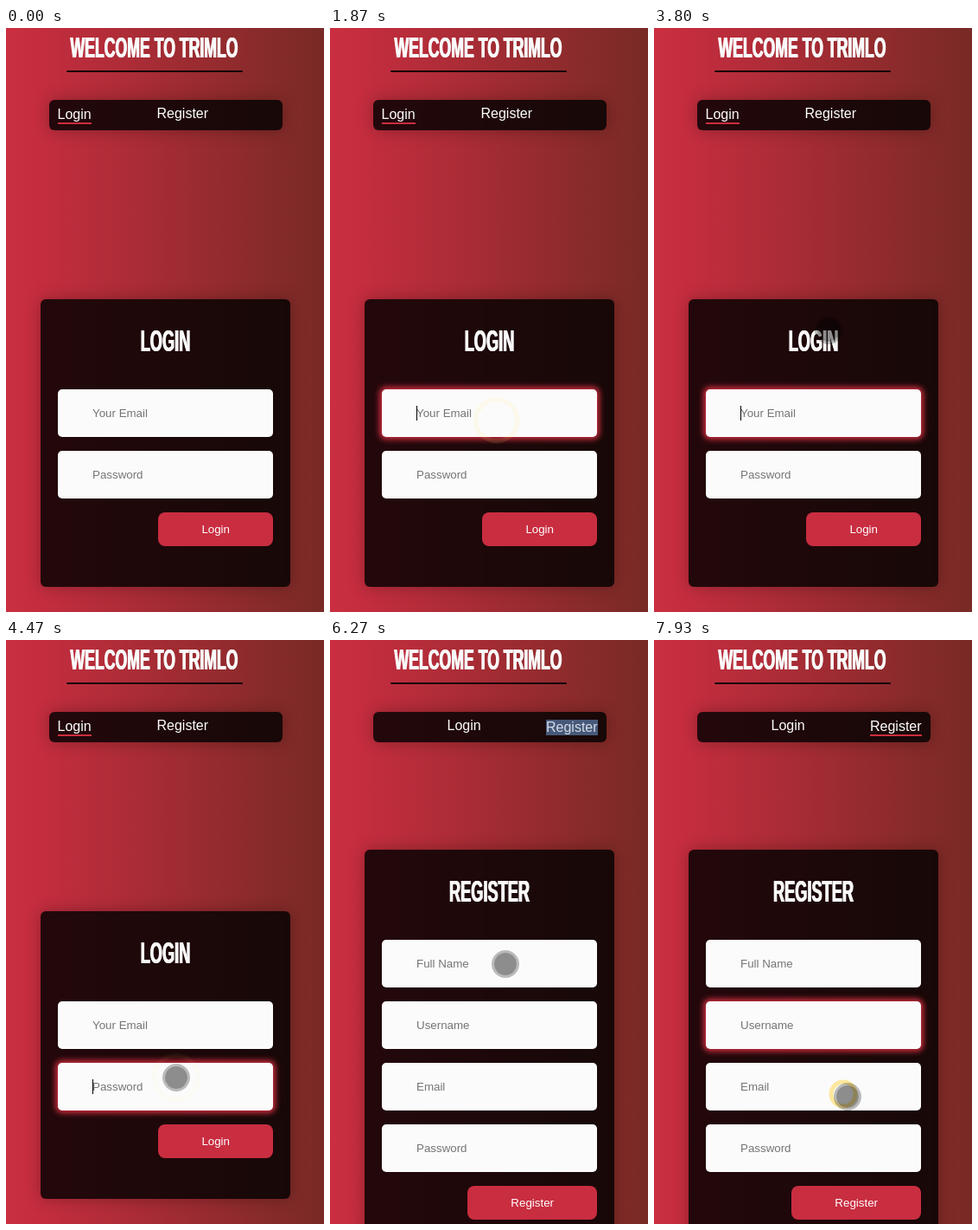
An HTML page that plays this animation: 368x674 px, repeating every 8 s.

```html
<!DOCTYPE html>
<html lang="en">
<head>
<meta charset="utf-8">
<title>Sign-in form</title>
<style>
  html, body { margin: 0; width: 100%; height: 100%; overflow: hidden; }
  body {
    position: relative; color: #fff;
    font: 16px/18px "Liberation Sans", Arial, sans-serif;
    background: linear-gradient(90deg, #c92f41, #c52d3f 10%, #782a25);
  }
  body * { position: absolute; box-sizing: border-box; white-space: nowrap; }
  [hidden] { display: none; }

  h1, h2 {
    margin: 0; font-size: 35px; line-height: 40px; color: #fafafa;
    transform: translateX(-50%) scaleX(.52);
    text-shadow: 1px 0 #fafafa, 2px 0 #eee;
  }
  h1 { left: 171px; top: 2px; font-size: 34px; }
  h2 { left: 144px; top: 28px; }
  hr { left: 70px; top: 49px; width: 204px; height: 2px; margin: 0; border: 0; border-radius: 1px; background: #160709; }

  nav, section {
    border-radius: 6px; background: rgba(0, 0, 0, .82);
    box-shadow: 0 0 18px rgba(0, 0, 0, .27);
  }
  nav { left: 50px; top: 83px; width: 270px; height: 35px; }
  nav span { top: 7px; }
  nav .active { top: 8px; height: 20px; border-bottom: 2px solid #cb2d3e; }
  nav .selected { top: 9px; height: 18px; border: 0; color: #d5dbe6; background: #46597a; }

  section { left: 40px; width: 289px; }
  .field {
    left: 20px; width: 249px; height: 55px; padding-left: 40px; border-radius: 5px;
    background: #fbfbfb; color: #757575; font-size: 13.333px; line-height: 55px;
  }
  .focus { box-shadow: 0 0 6px 3px #cb2d3e; }
  .caret::after {
    content: ""; position: absolute; left: 40px; top: 19px;
    width: 1px; height: 17px; background: #000;
  }
  .button {
    right: 20px; height: 39px; padding: 0 50px; border-radius: 8px;
    background: #c92d40; font-size: 13.333px; line-height: 39px;
  }

  #cursor {
    width: 32px; height: 32px; margin: -16px; border-radius: 50%;
    background: rgba(0, 0, 0, .44) padding-box; border: 3px solid rgba(0, 0, 0, .26);
  }
  #ring { border: 5px solid #ffe070; border-radius: 50%; transform: translate(-50%, -50%); }
</style>
</head>
<body>
<h1>WELCOME TO TRIMLO</h1>
<hr>
<nav><span id="loginTab">Login</span><span id="registerTab">Register</span></nav>
<div id="ring"></div>
<div id="cursor"></div>
<script>
const LOOP = 8000, SWITCH = 5270, RING_TIME = 300;
const $ = id => document.getElementById(id);

function add(parent, tag, text, className = "") {
  const el = document.createElement(tag);
  el.textContent = text;
  el.className = className;
  return parent.appendChild(el);
}

function makeForm(title, top, labels) {
  const panel = document.createElement("section");
  document.body.insertBefore(panel, $("ring"));
  panel.style.top = top + "px";
  panel.style.height = 190 + labels.length * 71 + "px";
  add(panel, "h2", title.toUpperCase());
  const fields = labels.map((label, i) => {
    const field = add(panel, "div", label, "field");
    field.style.top = 104 + i * 71 + "px";
    return field;
  });
  add(panel, "div", title, "button").style.top = 104 + labels.length * 71 + "px";
  return { panel, fields };
}

const login = makeForm("Login", 313, ["Your Email", "Password"]);
const register = makeForm("Register", 242, ["Full Name", "Username", "Email", "Password"]);
const allFields = [...login.fields, ...register.fields];

// Each focus lasts until the next entry.
const focusChanges = [
  { at: 1667, field: login.fields[0] },
  { at: 4230, field: login.fields[1] },
  { at: SWITCH, field: null },
  { at: 6400, field: register.fields[0] },
  { at: 7200, field: register.fields[1] }
];

// Clicks and pointer stops: time, x, y.
const clicks = [
  [1620, 193, 453], [4190, 197, 505], [5240, 229, 102],
  [6370, 203, 375], [7170, 211, 453], [7900, 219, 524]
];
const path = [
  [2200, 386, 330], [2700, 214, 198], [3000, 207, 210], [3500, 207, 212],
  [4130, 197, 505], [4470, 197, 505], [5130, 226, 104], [5270, 229, 102],
  [5470, 195, 145], [5700, 194, 165], [6300, 203, 375], [6550, 203, 378],
  [7000, 211, 456], [7250, 211, 456], [7850, 219, 524], [7930, 224, 527], [LOOP, 224, 527]
];

const last = (list, test) => list.filter(test).pop();

function pointerAt(t) {
  const i = path.findIndex(p => p[0] > t);
  if (i < 1) return null;
  const [t0, x0, y0] = path[i - 1], [t1, x1, y1] = path[i];
  const p = (t - t0) / (t1 - t0), ease = p * p * (3 - 2 * p);
  return [x0 + (x1 - x0) * ease, y0 + (y1 - y0) * ease];
}

function place(el, x, y) {
  el.style.left = x + "px";
  el.style.top = y + "px";
}

function render(t) {
  const registering = t >= SWITCH;
  login.panel.hidden = registering;
  register.panel.hidden = !registering;
  $("loginTab").className = registering ? "" : "active";
  $("loginTab").style.left = registering ? "85.5px" : "9.5px";
  $("registerTab").className = !registering ? "" : t < 6400 ? "selected" : "active";
  $("registerTab").style.left = registering ? "200px" : "124.5px";

  const focus = last(focusChanges, f => f.at <= t);
  for (const field of allFields) {
    const focused = !!focus && focus.field === field;
    field.classList.toggle("focus", focused);
    field.classList.toggle("caret", focused && (t - focus.at) % 1000 < 500);
  }

  const pointer = pointerAt(t);
  $("cursor").hidden = !pointer;
  if (pointer) place($("cursor"), ...pointer);

  const click = last(clicks, c => c[0] <= t && t < c[0] + RING_TIME);
  $("ring").hidden = !click;
  if (click) {
    const p = (t - click[0]) / RING_TIME, size = 30 + 28 * p;
    place($("ring"), click[1], click[2]);
    $("ring").style.width = $("ring").style.height = size + "px";
    $("ring").style.opacity = .75 * (1 - p);
  }
}

const start = performance.now();
function tick() {
  render((performance.now() - start) % LOOP);
  requestAnimationFrame(tick);
}
tick();
</script>
</body>
</html>
```
